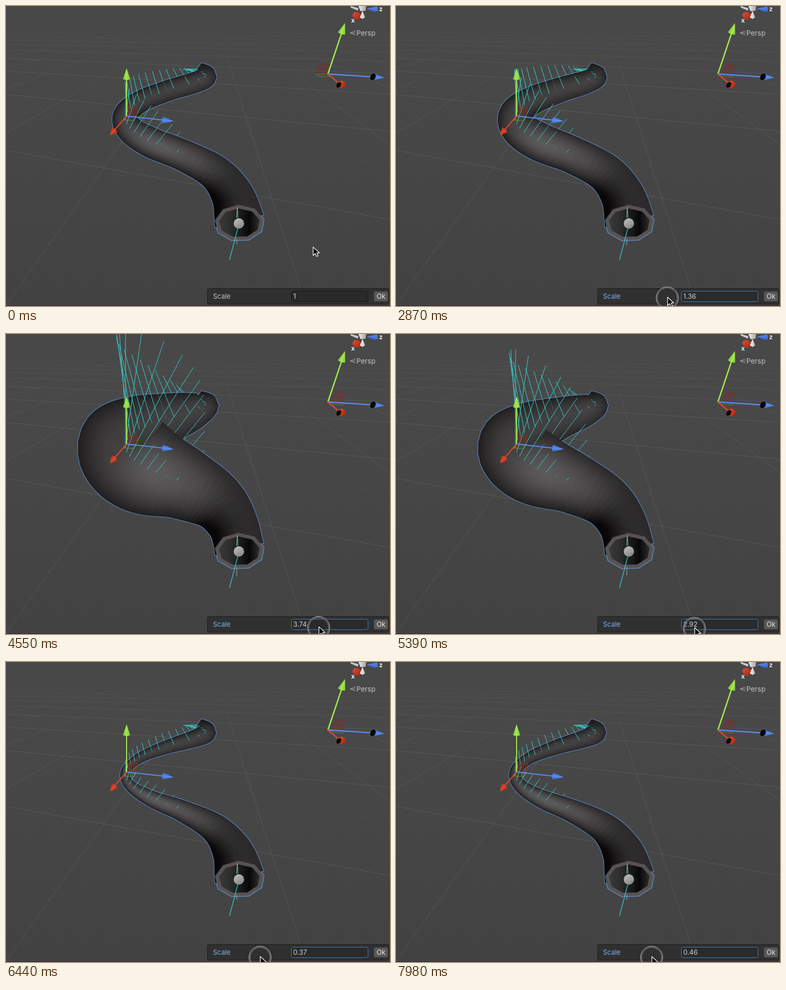
Animation, 742 px wide and 578 px high, one loop 8000 ms. Source, as an HTML page with a canvas:

```html
<!DOCTYPE html>
<html lang="en">
<head>
<meta charset="utf-8">
<title>Tube scale</title>
<style>
html, body { margin: 0; width: 100%; height: 100%; overflow: hidden; background: #464646; }
canvas { display: block; }
</style>
</head>
<body>
<canvas id="stage" width="742" height="578"></canvas>
<script>
const ctx = document.getElementById('stage').getContext('2d');
const LOOP = 8000, STEP = 70, PRESS_AT = 2030, FOCUS_AT = 2170, DRAG_AT = 2590;

// Tube path from the far end to the near one: centre, radius, normal vector (all at scale 1).
const path = [
  [370, 121, 13, -28, 1], [388, 135, 19, -32, -11], [366, 147, 20, -21, -28], [310, 164, 20, -14, -41],
  [258, 185, 21, -12, -50], [231, 211, 24, 0, -62], [240, 238, 26, 30, -54], [280, 263, 29, 34, -43],
  [343, 288, 30, 18, -18], [405, 322, 34, 6, 4], [438, 366, 41, -6, 35], [451, 414, 48, -18, 73]
];
const BEND = 5, END = path.length - 1;

const scaleKeys = [
  [2590, 1], [2870, 1.36], [3360, 1.8], [3780, 2.65], [4200, 3.6], [4550, 3.74], [5040, 3.74],
  [5880, 1.78], [6440, 0.37], [6930, 0.2], [7630, 0.2], [7840, 0.48], [7980, 0.46]
];
const cursorKeys = [
  [140, 593, 464], [280, 561, 535], [420, 561, 535], [630, 529, 487], [840, 529, 487],
  [1050, 520, 546], [1260, 520, 546], [1700, 497, 557], [2590, 511, 560]
];

const mix = (a, b, f) => a + (b - a) * f;
const clamp = v => Math.max(0, Math.min(1, v));
const bell = (x, centre, width) => Math.exp(-(((x - centre) / width) ** 2));

function sample(keys, at) {
  let i = 0;
  while (i < keys.length - 2 && keys[i + 1][0] <= at) i++;
  const a = keys[i], b = keys[i + 1];
  const f = clamp((at - a[0]) / (b[0] - a[0]));
  return a.slice(1).map((v, k) => mix(v, b[k + 1], f));
}

// Catmull-Rom through the path keys.
function along(p) {
  const i = Math.max(0, Math.min(END - 1, Math.floor(p))), f = p - i;
  const [a, b, c, d] = [i - 1, i, i + 1, i + 2].map(k => path[Math.max(0, Math.min(END, k))]);
  return b.map((v, k) => v + f / 2 * (c[k] - a[k]
    + f * (2 * a[k] - 5 * v + 4 * c[k] - d[k] + f * (3 * (v - c[k]) + d[k] - a[k]))));
}

function localScale(p, scale) {
  const x = p < BEND ? ((BEND - p) / BEND) ** 0.85 : (p - BEND) / (END - BEND);
  return mix(1, scale, 0.5 + 0.5 * Math.cos(Math.PI * x));
}

function ring(p, scale) {
  const [x, y, radius] = along(p);
  const before = along(Math.max(0, p - 0.05)), after = along(Math.min(END, p + 0.05));
  const dx = after[0] - before[0], dy = after[1] - before[1];
  const k = radius * localScale(p, scale) / Math.hypot(dx, dy);
  return { left: [x - dy * k, y + dx * k], right: [x + dy * k, y - dx * k] };
}

function brightness(p, u, scale) {
  const edge = mix(31, 41, u);
  const peak = 66 + 24 * bell(p, 7.1, 1.3) - 14 * clamp(p - 8.3);
  let v = mix(edge, peak, Math.sin(Math.PI * u));
  v -= 46 * bell(p, 9.9, 1) * (1 - u) ** 1.7;
  v *= 1 - 0.5 * u ** 3 * bell(p, 4.8, 1.2) * clamp(scale / 2);
  return Math.max(7, v * (1 - 0.45 * bell(p, 0, 0.8)));
}

function trace(p, close) {
  ctx.beginPath();
  for (let i = 0; i < p.length; i += 2) ctx.lineTo(p[i], p[i + 1]);
  if (close) ctx.closePath();
}
function poly(p, fill, stroke, width = 1) {
  trace(p, true);
  if (fill) { ctx.fillStyle = fill; ctx.fill(); }
  if (stroke) { ctx.strokeStyle = stroke; ctx.lineWidth = width; ctx.stroke(); }
}
function line(p, color, width = 1) {
  trace(p, false);
  ctx.strokeStyle = color;
  ctx.lineWidth = width;
  ctx.stroke();
}
function oval(x, y, rx, ry, fill, turn = 0) {
  ctx.beginPath();
  ctx.ellipse(x, y, rx, ry, turn, 0, 7);
  ctx.fillStyle = fill;
  ctx.fill();
}
function blend(x0, y0, x1, y1, ...colors) {
  const g = ctx.createLinearGradient(x0, y0, x1, y1);
  colors.forEach((c, i) => g.addColorStop(i / (colors.length - 1), c));
  return g;
}
function text(str, x, y, color, size = 13, weight = 400) {
  ctx.font = `${weight} ${size}px Inter, sans-serif`;
  ctx.fillStyle = color;
  ctx.fillText(str, x, y);
}
function box(x, y, w, h, r, fill, stroke) {
  ctx.beginPath();
  ctx.roundRect(x + 0.5, y + 0.5, w, h, r);
  ctx.fillStyle = fill;
  ctx.fill();
  ctx.strokeStyle = stroke;
  ctx.lineWidth = 1;
  ctx.stroke();
}
function ngon(x, y, rx, ry, sides, start) {
  return Array.from({ length: sides }, (_, i) => {
    const a = start + i * 2 * Math.PI / sides;
    return [x + rx * Math.cos(a), y + ry * Math.sin(a)];
  }).flat();
}
// A shaft with a cone; the cone's base is an ellipse seen at an angle.
function arrow(x0, y0, x1, y1, head, half, light, dark, width = 2) {
  const len = Math.hypot(x1 - x0, y1 - y0), dx = (x1 - x0) / len, dy = (y1 - y0) / len;
  const bx = x1 - dx * head, by = y1 - dy * head;
  line([x0, y0, bx, by], light, width);
  const ax = bx - dy * half, ay = by + dx * half, cx = bx + dy * half, cy = by - dx * half;
  poly([x1, y1, ax, ay, bx - dx * 2, by - dy * 2, cx, cy], blend(ax, ay, cx, cy, dark, light, dark));
  return [bx, by, Math.atan2(dy, dx)];
}
function plane(x, y, ax, ay, bx, by, rgb, fill) {
  poly([x, y, x + ax, y + ay, x + ax + bx, y + ay + by, x + bx, y + by], `rgba(${rgb},${fill})`, `rgba(${rgb},.6)`);
}

function drawGround() {
  ctx.fillStyle = blend(0, 0, 0, 578, '#484848', '#464646', '#424242');
  ctx.fillRect(0, 0, 742, 578);
  for (let k = 0; k < 100; k++) {
    const y = 15 + 1 / (0.0038 + 0.000263 * k), slope = (y - 48) * 0.00078;
    const alpha = (k % 10 ? 0.016 : 0.1) * clamp((y - 25) / 90);
    line([0, y, 742, y + 742 * slope], `rgba(255,255,255,${alpha})`);
  }
  for (let k = -50; k < 50; k++) {
    const slope = 0.32 + 0.1033 * k, alpha = k % 10 ? 0.012 : 0.09;
    const fade = blend(0, 30, 0, 200, 'rgba(255,255,255,0)', `rgba(255,255,255,${alpha})`);
    line([400, 15, 400 + slope * 563, 578], fade);
  }
}

function drawSegment(a, b, p, scale) {
  const mid = k => [(a[k][0] + b[k][0]) / 2, (a[k][1] + b[k][1]) / 2];
  const tones = Array.from({ length: 11 }, (_, i) => {
    const v = brightness(p, i / 10, scale);
    return `rgb(${v + 1},${v - 1},${v - 1})`;
  });
  const fill = blend(...mid('left'), ...mid('right'), ...tones);
  poly([...a.left, ...a.right, ...b.right, ...b.left], fill, fill, 0.8);
}

function drawHair(p, scale) {
  const [x, y, , hx, hy] = along(p), k = localScale(p, scale);
  line([x, y, x + hx * k, y + hy * k], '#35d2d2');
}

function drawTube(scale) {
  const PER_KEY = 6, count = END * PER_KEY;
  const rings = Array.from({ length: count + 1 }, (_, i) => ring(i / PER_KEY, scale));
  const rim = ngon(451, 418, 48, 35, 9, -1.6), outline = '#5f86bb';
  ctx.lineJoin = 'round';
  poly([...rings.map(r => r.left), ...rings.map(r => r.right).reverse()].flat(), null, outline, 3);
  poly(rim, null, outline, 3);

  // Painted far to near, so each hair is hidden by the surface in front of it.
  let nextHair = 0;
  for (let i = 0; i < count; i++) {
    const p = i / PER_KEY;
    while (nextHair <= p && nextHair < 8) {
      drawHair(nextHair, scale);
      nextHair += nextHair < BEND ? 0.25 : 0.31;
    }
    drawSegment(rings[i], rings[i + 1], p, scale);
  }

  line([398, 303, 421, 326, 438, 355, 447, 388], 'rgba(35,85,55,.4)');
  poly(rim, '#565252');
  poly(ngon(451, 418, 40, 28, 9, -1.6), blend(411, 0, 491, 0, '#3a3838', '#302f2f', '#1c1c1c', '#080808', '#303030'));
  line([447, 388, 446, 408], '#ddd');
  line([447, 388, 449, 410], '#2fae4a');
  line([446, 449, 446, 457 + scale * 2.7], '#aaa');
  line([448, 428, 432, 489], '#33d3d3', 1.2);
  oval(450, 419, 10, 10, blend(444, 410, 455, 429, '#bcbcbc', '#858585'));
}

const GREEN = ['#a2e84f', '#80c539'], RED = ['#e2472c', '#a92814'], BLUE = ['#5a8cec', '#3967cb'];

function drawMoveHandle() {
  plane(228, 216, 5, -5, 0, -16, '65,85,185', 0.1);
  plane(235, 211, 18, -1, 1, -17, '160,45,32', 0.28);
  plane(233, 212, 19, 1, -5, 8, '115,185,75', 0.1);
  arrow(233, 212, 233, 120, 21, 7, ...GREEN);
  arrow(233, 212, 324, 222, 21, 6.5, ...BLUE);
  arrow(233, 212, 201, 249, 14, 7.5, ...RED);
}

function drawCornerHandle(flipped) {
  const side = flipped ? 1 : -1;
  plane(622, 131, 10, 1, 4, -16, '70,75,170', 0.1);
  plane(flipped ? 629 : 600, 131, 20, 0, 5, -19, '140,40,32', 0.28);
  plane(622, 131, 24 * side, flipped ? 1 : 0, 6, 5, '95,150,70', 0.1);
  arrow(622, 131, 655, 33, 21, 7.5, ...GREEN, 2.6);
  const [bx, by, turn] = arrow(622, 131, 731, 138, 22, 7, ...BLUE, 2.4);
  oval(bx, by, 5, 7, '#080808', turn + 0.4);
  line([622, 131, 641, 147], RED[0], 2.4);
  oval(648, 151, 8, 7, blend(642, 145, 655, 157, ...RED));
  oval(643, 152, 4, 6, '#0a0808', 0.6);
}

function drawCompass() {
  poly([681, 0, 696, 0, 695, 9, 685, 10], blend(681, 0, 696, 0, '#eeeeee', '#a5a5a5'));
  poly([666, 0, 681, 4, 680, 9, 666, 3], '#c8c8c8');
  poly([697, 5, 717, 1, 719, 10, 712, 11], blend(0, 1, 0, 11, ...BLUE));
  oval(678, 19, 9, 7, blend(672, 12, 684, 26, ...RED), 0.4);
  poly([689, 9, 684, 22, 689, 25, 694, 22], blend(684, 0, 694, 0, '#ffffff', '#b0b0b0'));
  text('z', 721, 10, '#eee', 12, 700);
  text('x', 667, 32, '#eee', 12, 700);
  line([675, 48, 665, 52, 675, 56], '#aaa');
  line([675, 52, 665, 52], '#aaa');
  text('Persp', 677, 57, '#c5c5c5', 13.5);
}

function drawPanel(scale, focused) {
  box(389, 544, 350, 30, 2, '#303030', '#191919');
  text('Scale', 400, 564, focused ? '#7fb0ee' : '#c3c3c3');
  box(551, 549, 148, 20, 3, '#2a2a2a', focused ? '#3f7cbd' : '#121212');
  text(String(+scale.toFixed(2)), 555, 564, '#d0d0d0');
  box(710, 549, 28, 20, 3, '#575757', '#303030');
  text('Ok', 716, 564, '#eaeaea');
  ctx.fillStyle = '#32262d';
  ctx.fillRect(0, 577, 742, 1);
}

function drawCursor(x, y, pressed) {
  if (pressed) {
    const halo = (r, width, color) => {
      ctx.beginPath();
      ctx.arc(x, y + 2, r, 0, 7);
      ctx.strokeStyle = color;
      ctx.lineWidth = width;
      ctx.stroke();
    };
    halo(20.4, 3, 'rgba(20,20,20,.6)');
    halo(21.3, 1, '#dcdcdc');
    halo(19.2, 0.8, '#b0b0b0');
  }
  const shape = [0, 0, 0, 16, 4, 12.5, 6.5, 18, 9.5, 16.7, 7, 11.3, 12, 11];
  poly(shape.map((v, i) => v + (i % 2 ? y : x) + 0.5), '#080808', '#f4f4f4', 1.3);
}

function render(t) {
  const [scale] = sample(scaleKeys, t);
  const [x, y] = t < DRAG_AT
    ? sample(cursorKeys, t)
    : [478.5 + 33.6 * scale, 560 + Math.min(7, (t - DRAG_AT) / 540)];
  drawGround();
  drawTube(scale);
  drawMoveHandle();
  drawCornerHandle(t >= FOCUS_AT);
  drawCompass();
  drawPanel(scale, t >= FOCUS_AT);
  drawCursor(x, y, t >= PRESS_AT);
}

const start = performance.now();
function tick() {
  const t = (performance.now() - start) % LOOP;
  render(Math.floor(t / STEP) * STEP);
  requestAnimationFrame(tick);
}
tick();
</script>
</body>
</html>
```
